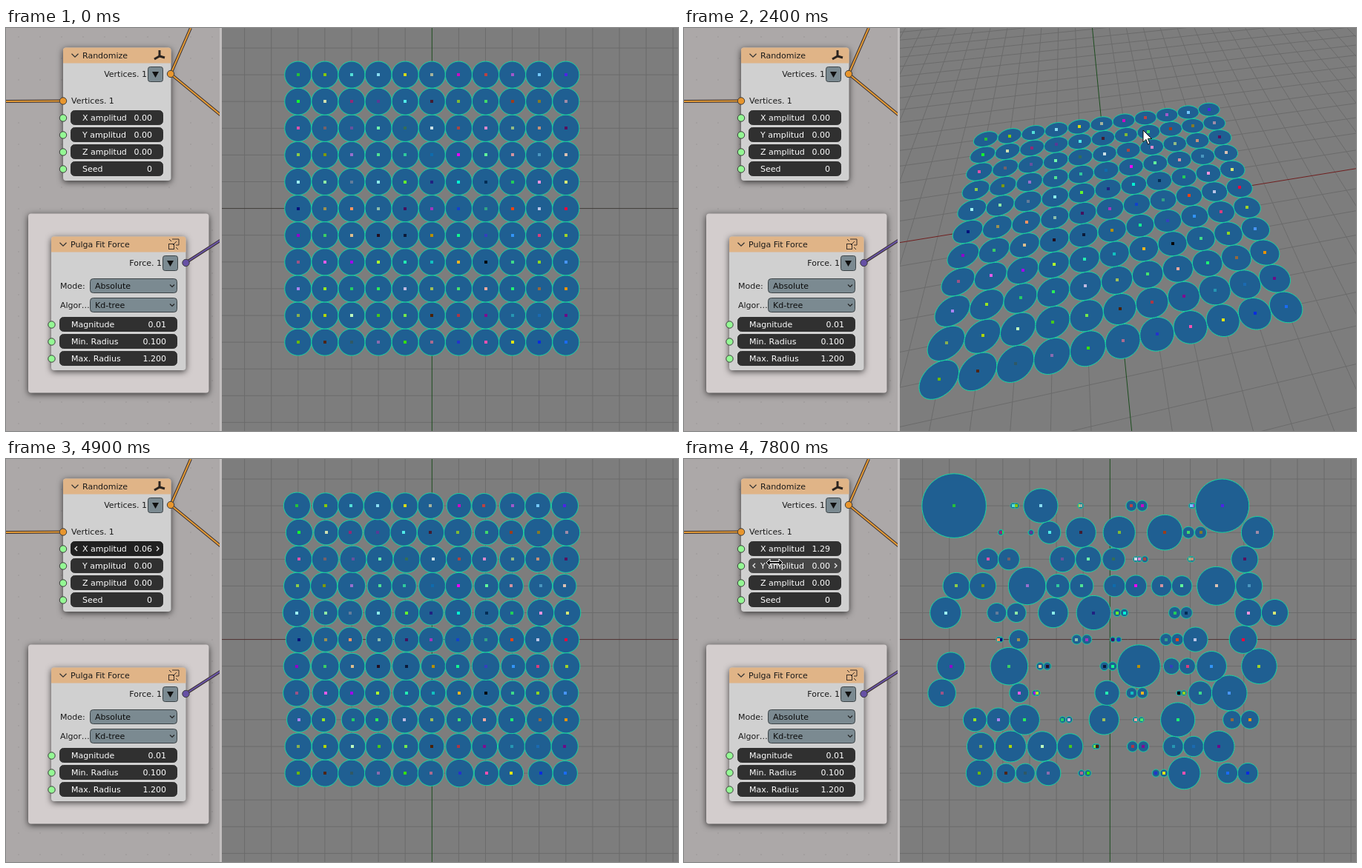
Write an HTML page with a canvas that moves like this. It is 906 px wide and 544 px high and loops after 8000 ms.

```html
<!DOCTYPE html>
<html>
<head>
<meta charset="utf-8">
<style>
html, body { margin: 0; width: 906px; height: 544px; overflow: hidden; background: #7d7d7d; }
canvas { display: block; }
</style>
</head>
<body>
<canvas id="stage" width="906" height="544"></canvas>
<script>
const g = document.getElementById('stage').getContext('2d');
const TAU = Math.PI * 2, LOOP = 8000, STEP = 100, N = 11;

// Each move: start, end, then the values reached at the end.
const orbit = [[1300, 1700, -11.1, 12.2], [1700, 2200, 9, 36.5], [2300, 2400, 12, 38.2],
  [2400, 2800, 22, 26.5], [2800, 2900, 0, 0]];
const path = [[100, 600, 510, 190], [600, 900, 584, 235], [1300, 1700, 550, 188], [1700, 2200, 612, 143],
  [2300, 2400, 619, 138], [2400, 2800, 633, 165], [3100, 4000, 139, 118], [4000, 4300, 121, 118],
  [7300, 7600, 127, 140], [7700, 7800, 122, 140]];
const drag = [[4700, 4900, .06], [5000, 5300, .52], [5400, 5700, .83], [5800, 6000, .86],
  [6100, 6400, 1.14], [6500, 6800, 1.29]];

function track(from, moves, t) {
  let v = from;
  for (const [start, end, ...to] of moves) {
    if (t <= start) break;
    const k = Math.min(1, (t - start) / (end - start));
    v = v.map((a, i) => a + (to[i] - a) * k);
  }
  return v;
}

// Mersenne Twister, giving 53-bit numbers in [0, 1)
function twister(seed) {
  const size = 624, s = new Uint32Array(size);
  let at = size;
  s[0] = seed;
  for (let i = 1; i < size; i++) s[i] = Math.imul(1812433253, s[i - 1] ^ (s[i - 1] >>> 30)) + i;
  function word() {
    if (at === size) {
      for (let i = 0; i < size; i++) {
        const y = (s[i] & 0x80000000) | (s[(i + 1) % size] & 0x7fffffff);
        s[i] = s[(i + 397) % size] ^ (y >>> 1) ^ (y & 1 ? 0x9908b0df : 0);
      }
      at = 0;
    }
    let y = s[at++];
    y ^= y >>> 11;
    y ^= (y << 7) & 0x9d2c5680;
    y ^= (y << 15) & 0xefc60000;
    y ^= y >>> 18;
    return y >>> 0;
  }
  return () => ((word() >>> 5) * 67108864 + (word() >>> 6)) / 2 ** 53;
}

const noise = twister(0), tint = twister(1);
const points = Array.from({ length: N * N }, (_, i) => {
  const [dx] = [noise(), noise(), noise()];
  const rgb = [tint(), tint(), tint()].map(v => Math.round(v * 255));
  return { x: i % N - 5, y: Math.floor(i / N) - 5, dx: dx * 2 - 1, color: `rgb(${rgb})` };
});

// Discs grow while free and shrink while overlapping.
const packed = new Map();
function pack(amp) {
  if (packed.has(amp)) return packed.get(amp);
  const discs = points.map(({ x, y, dx, color }) => ({ x: x + dx * amp, y, r: .5, hit: false, color }));
  const pairs = [];
  discs.forEach((a, i) => {
    for (const b of discs.slice(i + 1)) {
      const d = Math.hypot(a.x - b.x, a.y - b.y);
      if (d < 2.4) pairs.push([a, b, d - 1e-6]);
    }
  });
  for (let n = 0; n < 120; n++) {
    for (const d of discs) d.hit = false;
    for (const [a, b, dist] of pairs) if (dist < a.r + b.r) a.hit = b.hit = true;
    for (const d of discs) d.r = Math.min(1.2, Math.max(.1, d.r + (d.hit ? -.01 : .01)));
  }
  packed.set(amp, discs);
  return discs;
}

function camera(turn, tilt) {
  const rad = Math.PI / 180, c = Math.cos(turn * rad), s = Math.sin(turn * rad);
  const ct = Math.cos(tilt * rad), st = Math.sin(tilt * rad), scale = tilt ? 36.3 : 36.1;
  const depth = (x, y) => 1 + (x * s + y * c) * st / 13.8;
  const project = (x, y) => {
    const w = depth(x, y);
    return [574.3 + (scale * (x * c - y * s) + 110 * (w - 1)) / w, 243.6 - scale * (x * s + y * c) * ct / w];
  };
  return { depth, project };
}

function poly(points, close) {
  g.beginPath();
  points.forEach(([x, y]) => g.lineTo(x, y));
  if (close) g.closePath();
}

function line(points, color, width = 1) {
  poly(points);
  g.strokeStyle = color;
  g.lineWidth = width;
  g.stroke();
}

function worldLine(cam, a, b, color) {
  const near = .1, da = cam.depth(...a), db = cam.depth(...b);
  const cut = (p, q, dp, dq) => {
    if (dp >= near) return p;
    const k = (near - dp) / (dq - dp);
    return [p[0] + (q[0] - p[0]) * k, p[1] + (q[1] - p[1]) * k];
  };
  if (da < near && db < near) return;
  line([cam.project(...cut(a, b, da, db)), cam.project(...cut(b, a, db, da))], color);
}

function viewport(t) {
  const [turn, tilt] = track([0, 0], orbit, t);
  const cam = camera(turn, tilt), E = 40;
  g.save();
  g.beginPath();
  g.rect(291, 0, 615, 544);
  g.clip();
  g.fillStyle = '#7d7d7d';
  g.fillRect(291, 0, 615, 544);
  for (let i = -E; i <= E; i++) {
    if (!i) continue;
    worldLine(cam, [i, -E], [i, E], '#6b6b6b');
    worldLine(cam, [-E, i], [E, i], '#6b6b6b');
  }
  worldLine(cam, [-E, 0], [E, 0], t < 1400 ? '#413d3a' : tilt ? '#701f1f' : '#4f3030');
  worldLine(cam, [0, -E], [0, E], '#1d4d1f');
  const discs = pack(+track([0], drag, t)[0].toFixed(2));
  for (const d of discs) {
    const rim = [];
    for (let a = 0; a < TAU; a += TAU / 48) rim.push(cam.project(d.x + d.r * Math.cos(a), d.y + d.r * Math.sin(a)));
    poly(rim, true);
    g.fillStyle = '#1f5f92';
    g.strokeStyle = '#18d5a2';
    g.lineWidth = 1;
    g.fill();
    g.stroke();
  }
  for (const d of discs) {
    const [x, y] = cam.project(d.x, d.y);
    g.fillStyle = d.color;
    g.fillRect(Math.round(x) - 2, Math.round(y) - 2, 4, 4);
  }
  g.restore();
}

function box(x, y, w, h, r, fill, stroke) {
  g.beginPath();
  g.roundRect(x, y, w, h, r);
  g.fillStyle = fill;
  g.fill();
  if (stroke) {
    g.strokeStyle = stroke;
    g.lineWidth = 1;
    g.stroke();
  }
}

function shadowed(...args) {
  g.save();
  g.shadowColor = 'rgba(0,0,0,.7)';
  g.shadowBlur = 9;
  g.shadowOffsetY = 2;
  box(...args);
  g.restore();
}

function text(s, x, y, color = '#1a1a1a', align = 'left') {
  g.font = '11px "DejaVu Sans", sans-serif';
  g.textAlign = align;
  g.fillStyle = color;
  g.fillText(s, x, y);
}

function socket(x, y, color) {
  g.beginPath();
  g.arc(x, y, 4.7, 0, TAU);
  g.fillStyle = color;
  g.fill();
  g.strokeStyle = '#3a3a3a';
  g.lineWidth = 1;
  g.stroke();
}

function wire(color, ...points) {
  line(points, '#3b3030', 4);
  line(points, color, 2);
}

const chevron = (x, y, s, color) => line([[x - s, y - s / 2], [x, y + s / 2], [x + s, y - s / 2]], color, 1.2);

function node(x, y, w, h, title) {
  shadowed(x, y, w, h, 4, '#d0d0d0');
  box(x, y, w, 21, [4, 4, 0, 0], '#e0b487');
  chevron(x + 16, y + 10.5, 4.5, '#333');
  text(title, x + 26, y + 14);
}

function menuButton(x, y) {
  box(x + .5, y + .5, 20, 20, 3, '#7b8a91', '#3c4346');
  poly([[x + 6, y + 7], [x + 15, y + 7], [x + 10.5, y + 15]], true);
  g.fillStyle = '#111';
  g.fill();
}

function select(y, label, value) {
  text(label, 73, y + 4);
  box(113.5, y - 9.5, 117, 19, 4, '#7b8a91', '#3c4346');
  text(value, 120, y + 4, '#0c0c0c');
  chevron(224, y, 3, '#222');
}

function field(x, y, w, label, value, state) {
  const fill = state === 'active' ? '#202020' : state ? '#464646' : '#303030';
  box(x + .5, y - 9.5, w - 1, 19, 5, fill, fill);
  text(label, x + 16, y + 4, '#fff');
  text(value, x + w - 15, y + 4, '#fff', 'right');
  if (!state) return;
  line([[x + 9, y - 3], [x + 6, y], [x + 9, y + 3]], '#e8e8e8', 1.3);
  line([[x + w - 9, y - 3], [x + w - 6, y], [x + w - 9, y + 3]], '#e8e8e8', 1.3);
}

function nodes(t) {
  g.save();
  g.beginPath();
  g.rect(0, 0, 288, 544);
  g.clip();
  g.fillStyle = '#aca8a8';
  g.fillRect(0, 0, 288, 544);
  g.fillStyle = '#a39f9f';
  for (let x = 16; x < 288; x += 29) for (let y = 11; y < 544; y += 29) g.fillRect(x, y, 2, 2);

  shadowed(30, 250.5, 243.5, 242, 4, '#d3cdcd');
  node(77, 26.5, 145.5, 179.5, 'Randomize');
  for (const end of [[207, 30], [200, 42], [214, 40]]) line([[207, 38], end], '#2b2420', 3);
  text('Vertices. 1', 190, 66, '#1a1a1a', 'right');
  menuButton(191, 52);
  text('Vertices. 1', 88, 102);
  wire('#e39a35', [0, 99], [77, 98.5]);
  wire('#e39a35', [249, 0], [222, 62], [290, 118]);
  socket(77, 98.5, '#e8962e');
  socket(222, 62, '#e8962e');

  const hover = t < 4000 ? -1 : t < 7400 ? 0 : 1;
  const state = i => i !== hover ? '' : t >= 4500 && t < 7300 ? 'active' : 'hover';
  const amp = track([0], drag, t)[0].toFixed(2);
  [['X amplitud', amp], ['Y amplitud', '0.00'], ['Z amplitud', '0.00'], ['Seed', '0']].forEach(([label, value], i) => {
    const y = 121 + i * 23;
    field(87, y, 125, label, value, state(i));
    socket(77, y + .5, '#94f894');
  });

  node(61, 281.5, 181.5, 180.5, 'Pulga Fit Force');
  line([[224, 285], [233, 285], [233, 293], [229, 293]], '#3a2f28');
  g.strokeRect(219.5, 291.5, 7, 7);
  for (const [x, y] of [[220, 285], [229, 296]]) line([[x, y], [x + 3, y + 3]], '#3a2f28');
  line([[225, 293], [230, 288]], '#3a2f28');
  text('Force. 1', 210, 321, '#1a1a1a', 'right');
  menuButton(211, 307);
  wire('#6a55a8', [242, 317], [290, 286]);
  socket(242.5, 317, '#6650a5');
  select(348, 'Mode:', 'Absolute');
  select(374, 'Algor…', 'Kd-tree');
  [['Magnitude', '0.01'], ['Min. Radius', '0.100'], ['Max. Radius', '1.200']].forEach(([label, value], i) => {
    const y = 400 + i * 23;
    field(72, y, 159, label, value);
    socket(61.5, y + .5, '#94f894');
  });
  g.restore();
  g.fillStyle = '#c2bfbf';
  g.fillRect(288, 0, 3, 544);
}

function pointer(t) {
  if (t < 100 || t >= 4500 && t < 7300) return;
  const [x, y] = track([863, 41], path, t), arrow = t < 4000;
  const shape = arrow
    ? [[0, 0], [0, 16], [4, 12.5], [6.5, 19], [9, 18], [6.5, 11.5], [11.5, 11.5]]
    : [[-11, 0], [-6, -5], [-6, -1.5], [6, -1.5], [6, -5], [11, 0], [6, 5], [6, 1.5], [-6, 1.5], [-6, 5]];
  poly(shape.map(([a, b]) => [x + a, y + b]), true);
  g.fillStyle = arrow ? '#fff' : '#111';
  g.strokeStyle = arrow ? '#111' : '#fff';
  g.lineWidth = 1;
  g.fill();
  g.stroke();
}

const start = performance.now();
let shown = -1;
function frame() {
  const t = Math.floor((performance.now() - start) % LOOP / STEP) * STEP;
  if (t !== shown) {
    shown = t;
    viewport(t);
    nodes(t);
    pointer(t);
  }
  requestAnimationFrame(frame);
}
frame();
</script>
</body>
</html>
```
